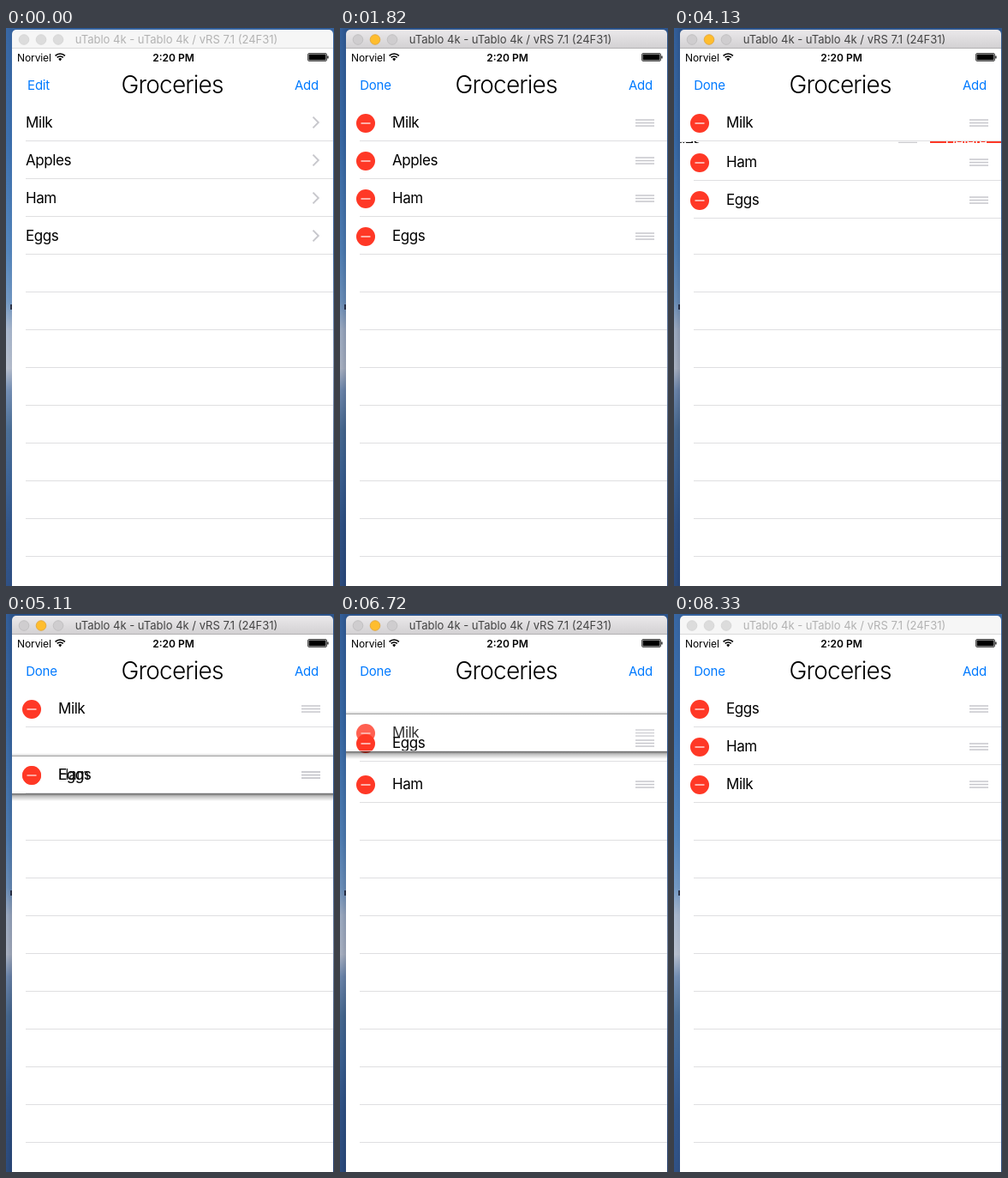
An HTML page with a canvas that plays this animation: 383x650 px, repeating every 8470 ms.

```html
<!DOCTYPE html>
<html lang="en">
<head>
<meta charset="utf-8">
<title>Groceries</title>
<style>
html, body { margin: 0; width: 100%; height: 100%; overflow: hidden; background: #fff; }
canvas { display: block; width: 383px; height: 650px; }
</style>
</head>
<body>
<canvas id="stage"></canvas>
<script>
const W = 383, H = 650, LOOP = 8470, TICK = 70;
const LEFT = 7, RIGHT = 382, ROW = 44;
const RED = '#ff3826', BLUE = '#007aff', GREY = '#c7c7cc', LINE = '#dfdfe1';
const FONT = 'Inter, Roboto, "Liberation Sans", sans-serif';

const canvas = document.getElementById('stage');
const c = canvas.getContext('2d');
const dpr = window.devicePixelRatio || 1;
canvas.width = W * dpr;
canvas.height = H * dpr;

const clamp = v => Math.max(0, Math.min(1, v));
const mix = (a, b, p) => a + (b - a) * p;
const smooth = (t, a, b) => {
  const u = clamp((t - a) / (b - a));
  return u * u * (3 - 2 * u);
};

// critically damped spring from 0 to 1
function spring(t, start, rate = 13) {
  const x = Math.max(0, t - start) / 1000 * rate;
  const p = 1 - Math.exp(-x) * (1 + x);
  return p > 0.992 ? 1 : p;
}

function rect(x, y, w, h, fill) {
  c.fillStyle = fill;
  c.fillRect(x, y, w, h);
}

function disc(x, y, r, fill, edge) {
  c.beginPath();
  c.arc(x, y, r, 0, Math.PI * 2);
  c.fillStyle = fill;
  c.fill();
  if (edge) {
    c.strokeStyle = edge;
    c.lineWidth = 0.8;
    c.stroke();
  }
}

function text(str, x, y, size, { color = '#000', weight = 400, align = 'left', gap = 0 } = {}) {
  c.font = `${weight} ${size}px ${FONT}`;
  c.letterSpacing = gap + 'px';
  c.textAlign = align;
  c.fillStyle = color;
  c.fillText(str, x, y);
}

function faded(alpha, draw) {
  if (alpha <= 0) return;
  c.save();
  c.globalAlpha *= alpha;
  draw();
  c.restore();
}

function clipped(x, y, w, h, draw) {
  c.save();
  c.beginPath();
  c.rect(x, y, w, h);
  c.clip();
  draw();
  c.restore();
}

function ramp(y0, y1, stops) {
  const g = c.createLinearGradient(0, y0, 0, y1);
  stops.forEach(([at, color]) => g.addColorStop(at, color));
  return g;
}

function drawDesktop(active) {
  rect(0, 0, W, H, ramp(0, H, [
    [0, '#3b6cab'], [0.2, '#4077b8'], [0.4, '#5a8fc8'], [0.49, '#7ba3cf'],
    [0.54, '#b4c3d8'], [0.61, '#c3cbd9'], [0.65, '#7d99bf'], [0.72, '#52779f'],
    [0.8, '#436c9f'], [0.89, '#365c92'], [1, '#33568b']
  ]));
  rect(5, 322, 2, 6, '#30384c');
  rect(RIGHT, 0, 1, H, ramp(0, H, [
    [0, '#3b6cab'], [0.4, '#3f6fae'], [0.6, '#8ca3c4'], [0.8, '#4b6c9c'], [1, '#2f4f84']
  ]));
  const shade = c.createLinearGradient(0, 0, LEFT, 0);
  const depth = active ? 0.25 : 0.1;
  shade.addColorStop(0, `rgba(0,10,40,${depth / 2})`);
  shade.addColorStop(1, `rgba(0,10,40,${depth})`);
  rect(0, 0, W, H, shade);
}

function drawTitleBar(active) {
  c.beginPath();
  c.roundRect(LEFT, 2, RIGHT - LEFT, 30, 5);
  c.fillStyle = active ? ramp(2, 24, [[0, '#ebe9eb'], [1, '#d2d0d2']]) : '#f6f6f6';
  c.fill();
  rect(LEFT, 23, RIGHT - LEFT, 1, active ? '#b3b1b3' : '#dadada');
  const off = active ? ['#cfcdcf', '#bcbabc'] : ['#dcdcdc', '#d2d2d2'];
  disc(21, 13.5, 5.8, ...off);
  disc(41, 13.5, 5.8, ...(active ? ['#ffbd2e', '#e0a030'] : off));
  disc(61, 13.5, 5.8, ...off);
  text('uTablo 4k - uTablo 4k / vRS 7.1 (24F31)', 199, 18, 13,
    { align: 'center', color: active ? '#434343' : '#b2b2b2' });
}

function drawStatus() {
  text('Norviel', 13, 38.5, 12, { gap: -0.1 });
  text('2:20 PM', 195.5, 38.5, 12, { weight: 600, align: 'center' });
  const a = -Math.PI * 0.75, b = -Math.PI * 0.25;
  c.strokeStyle = '#000';
  c.lineWidth = 1.7;
  for (const r of [5, 8]) {
    c.beginPath();
    c.arc(63.2, 38, r, a, b);
    c.stroke();
  }
  c.beginPath();
  c.moveTo(63.2, 38.4);
  c.arc(63.2, 38, 2.8, a, b);
  c.fillStyle = '#000';
  c.fill();
  c.beginPath();
  c.roundRect(352.5, 29.5, 22, 9, 1.5);
  c.lineWidth = 0.7;
  c.stroke();
  rect(353.5, 30.5, 20, 7, '#000');
  rect(375.3, 32.5, 1.2, 3, '#000');
}

function drawNav(edit) {
  const link = { color: BLUE, align: 'center', gap: -0.24 };
  faded(1 - edit, () => text('Edit', 38, 71.5, 15, link));
  faded(edit, () => text('Done', 41.5, 71.5, 15, link));
  text('Add', 351, 71.5, 15, link);
  text('Groceries', 194, 76, 28, { weight: 300, align: 'center', gap: -0.8 });
}

function drawMinus(x, y) {
  disc(x, y, 11, RED);
  rect(x - 5.5, y - 0.8, 11, 1.6, 'rgba(255,255,255,.75)');
}

function drawChevron(y) {
  c.beginPath();
  c.moveTo(358.5, y - 6.3);
  c.lineTo(364.8, y);
  c.lineTo(358.5, y + 6.3);
  c.strokeStyle = GREY;
  c.lineWidth = 1.9;
  c.stroke();
}

function drawGrip(x, y) {
  for (const d of [-4.2, -0.7, 2.8]) rect(x, y + d, 22, 1.5, GREY);
}

function drawContent(name, y, edit, dx = 0) {
  const mid = y + 22;
  if (edit > 0) drawMinus(30 - 38 * (1 - edit) + dx, mid + 1);
  text(name, 23 + 38 * edit + dx, mid + 6, 17, { gap: -0.41 });
  faded(1 - edit, () => drawChevron(mid));
  faded(edit, () => drawGrip(345 + dx, mid + 0.5));
}

function drawRow(name, y, edit) {
  rect(23, y + ROW - 1, RIGHT - 23, 1, LINE);
  drawContent(name, y, edit);
}

function drawDragged(name, y, lift) {
  const black = a => `rgba(0,0,0,${a * lift})`;
  const end = y + ROW;
  rect(LEFT, y - 3, RIGHT - LEFT, 4, ramp(y - 3, y + 1, [[0, black(0)], [0.6, black(0.12)], [1, black(0.45)]]));
  rect(LEFT, end, RIGHT - LEFT, 9, ramp(end, end + 9, [[0, black(0.6)], [0.35, black(0.25)], [1, black(0)]]));
  faded(1 - 0.2 * lift, () => drawRow(name, y, 1));
}

// the row that slides aside, shows its button and closes up
function drawRemoved(name, edit, reveal, gone) {
  const h = Math.round(ROW * (1 - gone));
  if (h <= 0) return;
  const shift = 83 * reveal, edge = RIGHT - shift, y = 132;
  const top = y - (ROW - h) / 2;
  clipped(LEFT, y, edge - LEFT, h, () => {
    drawContent(name, top, edit, -shift);
    faded(1 - gone, () => rect(23 - shift, y + h - 1, RIGHT - 23, 1, LINE));
    if (gone > 0) rect(LEFT, y + h - 2, 13, 1, LINE);
  });
  clipped(edge, y, shift, h, () => {
    rect(edge, y, shift, h, RED);
    text('Delete', 341, top + 28, 17, { color: '#fff', align: 'center', gap: -0.41 });
  });
}

function dragHam(t) {
  const pull = 57 * smooth(t, 4790, 5365);
  return mix(pull, ROW, spring(t, 5390, 18));
}

function dragMilk(t) {
  if (t < 6370) return 0;
  const pull = 6 + 74 * smooth(t, 6510, 7090);
  return mix(pull, 2 * ROW, spring(t, 7130, 18));
}

function liftOf(t, up, release, down) {
  return t < up ? 0 : 1 - smooth(t, release, down);
}

function draw(t) {
  c.setTransform(dpr, 0, 0, dpr, 0, 0);
  c.textBaseline = 'alphabetic';
  const active = t >= 1190 && t < 8330;
  const edit = spring(t, 1300, 16);
  const gone = spring(t, 3760);

  drawDesktop(active);
  drawTitleBar(active);
  rect(LEFT, 24, RIGHT - LEFT, H - 24, '#fff');
  drawStatus();
  drawNav(edit);

  const rows = [
    { name: 'Milk', y: 88 + dragMilk(t), lift: liftOf(t, 6370, 7150, 7560) },
    { name: 'Ham', y: 176 - ROW * (gone + spring(t, 6895)) + dragHam(t), lift: liftOf(t, 4830, 5430, 5810) },
    { name: 'Eggs', y: 220 - ROW * (gone + spring(t, 5036) + spring(t, 6680)), lift: 0 }
  ];

  clipped(LEFT, 24, RIGHT - LEFT, H - 24, () => {
    for (let y = 263; y < H; y += ROW) rect(23, y, RIGHT - 23, 1, LINE);
    drawRemoved('Apples', edit, spring(t, 2850), gone);
    rows.filter(r => !r.lift).forEach(r => drawRow(r.name, Math.round(r.y), edit));
    rows.filter(r => r.lift).forEach(r => drawDragged(r.name, Math.round(r.y), r.lift));
  });
}

const begin = performance.now();
function frame() {
  const t = (performance.now() - begin) % LOOP;
  draw(Math.floor(t / TICK) * TICK);
  requestAnimationFrame(frame);
}
frame();
</script>
</body>
</html>
```
